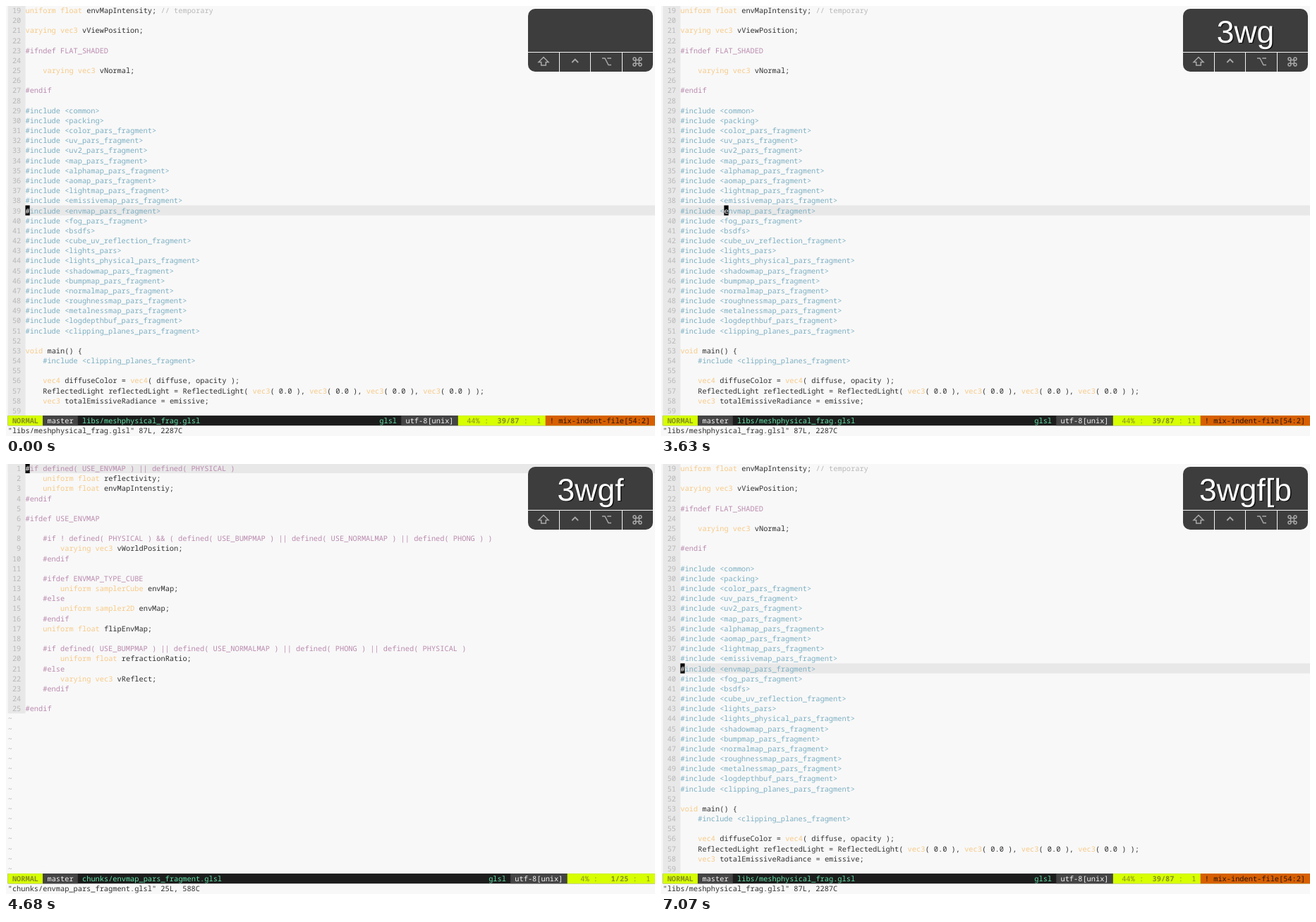
Write an HTML page that moves like this. It is 920x609 px and loops after 9.47 s.

```html
<!DOCTYPE html>
<html lang="en">
<head>
<meta charset="utf-8">
<title>Jumping between shader files</title>
<style>
html, body { margin: 0; width: 100%; height: 100%; overflow: hidden; background: #f8f8f8; }
svg { display: block; width: 920px; height: 609px; }
text { white-space: pre; text-rendering: geometricPrecision; }
.mono { font: 10.325px "Noto Sans Mono", "DejaVu Sans Mono", monospace; }
.keys { font: 44.5px "Liberation Sans", Arial, sans-serif; text-anchor: middle; }
</style>
</head>
<body>
<svg id="stage" viewBox="0 0 920 609"></svg>
<script>
(() => {
const LOOP = 9470;
const X0 = 2.7, CW = 6.195, RH = 14.175, ROWS = 41;
const C = {
  bg: '#f8f8f8', gutter: '#e8e8e8', dim: '#b8b8b8', text: '#303030',
  type: '#f7ca88', pre: '#ba8baf', inc: '#7cafc2',
  lime: '#d7ff00', olive: '#858f20', dark: '#1c1c1c', grey: '#444444', mint: '#62e3a8',
  warn: '#d75f00', panel: '#3d3d3d', icon: '#a8a8a8'
};

const parts = ['color', 'uv', 'uv2', 'map', 'alphamap', 'aomap', 'lightmap', 'emissivemap', 'envmap', 'fog',
  '=bsdfs', '=cube_uv_reflection_fragment', '=lights_pars', 'lights_physical', 'shadowmap', 'bumpmap',
  'normalmap', 'roughnessmap', 'metalnessmap', 'logdepthbuf', 'clipping_planes'];
const include = p => `#include <${p[0] === '=' ? p.slice(1) : p + '_pars_fragment'}>`;

const mesh = {
  path: 'libs/meshphysical_frag.glsl', info: '87L, 2287C', first: 19, total: 87, percent: '44%',
  row: 20, warning: ' ! mix-indent-file[54:2]',
  lines: `uniform float envMapIntensity; // temporary

varying vec3 vViewPosition;

#ifndef FLAT_SHADED

    varying vec3 vNormal;

#endif

#include <common>
#include <packing>
${parts.map(include).join('\n')}

void main() {
    #include <clipping_planes_fragment>

    vec4 diffuseColor = vec4( diffuse, opacity );
    ReflectedLight reflectedLight = ReflectedLight( ${Array(4).fill('vec3( 0.0 )').join(', ')} );
    vec3 totalEmissiveRadiance = emissive;
`.split('\n')
};

const envmap = {
  path: 'chunks/envmap_pars_fragment.glsl', info: '25L, 588C', first: 1, total: 25, percent: '4%',
  row: 0, warning: '',
  lines: `#if defined( USE_ENVMAP ) || defined( PHYSICAL )
    uniform float reflectivity;
    uniform float envMapIntenstiy;
#endif

#ifdef USE_ENVMAP

    #if ! defined( PHYSICAL ) && ( defined( USE_BUMPMAP ) || defined( USE_NORMALMAP ) || defined( PHONG ) )
        varying vec3 vWorldPosition;
    #endif

    #ifdef ENVMAP_TYPE_CUBE
        uniform samplerCube envMap;
    #else
        uniform sampler2D envMap;
    #endif
    uniform float flipEnvMap;

    #if defined( USE_BUMPMAP ) || defined( USE_NORMALMAP ) || defined( PHONG ) || defined( PHYSICAL )
        uniform float refractionRatio;
    #else
        varying vec3 vReflect;
    #endif

#endif`.split('\n')
};

// start time, keys typed, file shown, file named in the command line, cursor column
const steps = [
  { at: 0, keys: '', file: mesh, cmd: mesh, col: 1, cursor: true },
  { at: 1650, keys: '3', file: mesh, cmd: mesh, col: 1, cursor: true },
  { at: 2430, keys: '3w', file: mesh, cmd: mesh, col: 11, cursor: true },
  { at: 3630, keys: '3wg', file: mesh, cmd: mesh, col: 11, cursor: true },
  { at: 4530, keys: '3wgf', file: mesh, cmd: envmap, col: 11, cursor: false },
  { at: 4680, keys: '3wgf', file: envmap, cmd: envmap, col: 1, cursor: true },
  { at: 6320, keys: '3wgf[', file: envmap, cmd: envmap, col: 1, cursor: true },
  { at: 6920, keys: '3wgf[b', file: envmap, cmd: mesh, col: 1, cursor: false },
  { at: 7070, keys: '3wgf[b', file: mesh, cmd: mesh, col: 1, cursor: true }
];

const esc = s => s.replace(/&/g, '&amp;').replace(/</g, '&lt;');
const rowY = row => row * RH - 1.1;
const colX = col => X0 + col * CW;
const rect = (x, y, w, h, fill, extra = '') =>
  `<rect x="${x}" y="${y}" width="${w}" height="${h}" fill="${fill}" ${extra}/>`;
const cells = (col, row, n, fill, rows = 1) => rect(colX(col), rowY(row), n * CW, rows * RH, fill);
const toEdge = (col, row, fill) => rect(colX(col), rowY(row), 920 - colX(col), RH, fill);
const write = (col, row, str, fill, weight = 400) =>
  `<text class="mono" x="${colX(col)}" y="${rowY(row) + 11.1}" fill="${fill}" style="font-weight:${weight}">${esc(str)}</text>`;

function codeLine(line, row) {
  if (/^\s*#/.test(line)) return write(4, row, line, line.includes('#include') ? C.inc : C.pre);
  let out = '';
  for (const m of line.matchAll(/\/\/.*|\S+?(?=\(|\s|$)|\S/g)) {
    const word = m[0];
    const fill = word.startsWith('//') ? C.dim
      : /^(uniform|varying|float|void|vec\d|sampler\w+)$/.test(word) ? C.type : C.text;
    out += write(4 + m.index, row, word, fill);
  }
  return out;
}

function statusLine({ file, col }) {
  const limeCol = file.warning ? 103 : 128;
  const row = ROWS;
  const line = `${file.first + file.row}/${file.total}`;
  return toEdge(0, row, C.dark) +
    cells(0, row, 8, C.lime) + write(1, row, 'NORMAL', C.olive, 700) +
    cells(8, row, 8, C.grey) + write(9, row, 'master', '#f4f4f4') +
    write(17, row, file.path, C.mint) +
    write(limeCol - 18, row, 'glsl', C.mint) +
    cells(limeCol - 13, row, 13, C.grey) + write(limeCol - 12, row, 'utf-8[unix]', '#f4f4f4') +
    toEdge(limeCol, row, C.lime) +
    write(limeCol + 1, row, file.percent.padStart(4) + ' :', C.olive) +
    write(limeCol + 8, row, line.padStart(6), C.olive, 700) +
    write(limeCol + 15, row, ':' + String(col).padStart(3), C.olive) +
    (file.warning ? toEdge(123, row, C.warn) + write(123, row, file.warning, '#2a1408') : '');
}

function editor(step) {
  const { file, cmd, col, cursor } = step;
  const n = file.lines.length;
  let out = cells(0, 0, 4, C.gutter, n) + toEdge(0, file.row, C.gutter);
  for (let r = 0; r < ROWS; r++) {
    out += r < n
      ? write(0, r, String(file.first + r).padStart(3), C.dim) + codeLine(file.lines[r], r)
      : write(0, r, '~', C.dim);
  }
  if (cursor) {
    out += cells(col + 3, file.row, 1, '#000') +
      write(col + 3, file.row, file.lines[file.row][col - 1], '#fff');
  }
  return out + statusLine(step) + write(0, ROWS + 1, `"${cmd.path}" ${cmd.info}`, C.text);
}

function keyPanel(keys) {
  const loop = (x, y) => `<circle cx="${x}" cy="${y}" r="2"/>`;
  return rect(740, 4, 177, 89, C.panel, 'rx="10"') +
    `<path d="M740 65.5H917M784.5 66V93M828.5 66V93M873.5 66V93" stroke="#f4f4f4" fill="none"/>
    <g fill="none" stroke="${C.icon}" stroke-width="1.5">
      <path d="M762 72.5L769 79.5H765.3V84H758.7V79.5H755Z"/>
      <path d="M802.3 80L806.7 75.5L811.1 80" stroke-width="1.8"/>
      <path d="M845 74H849L854 83.5H858M852.3 74H858"/>
      <path d="M893 76.5H897M893 81.5H897M892.5 77V81M897.5 77V81"/>
      ${loop(891, 75) + loop(899, 75) + loop(891, 83) + loop(899, 83)}
    </g>
    <text class="keys" x="830" y="53" fill="#111">${keys}</text>
    <text class="keys" x="828.5" y="51.5" fill="#fff">${keys}</text>`;
}

const stage = document.getElementById('stage');
const start = performance.now();
let shown = null;

function render(time) {
  const step = steps.filter(s => s.at <= time).pop();
  if (step === shown) return;
  shown = step;
  stage.innerHTML = rect(0, 0, 920, 609, C.bg) + editor(step) + keyPanel(step.keys);
}

function tick() {
  render(Math.max(0, performance.now() - start) % LOOP);
  requestAnimationFrame(tick);
}
tick();
})();
</script>
</body>
</html>
```
